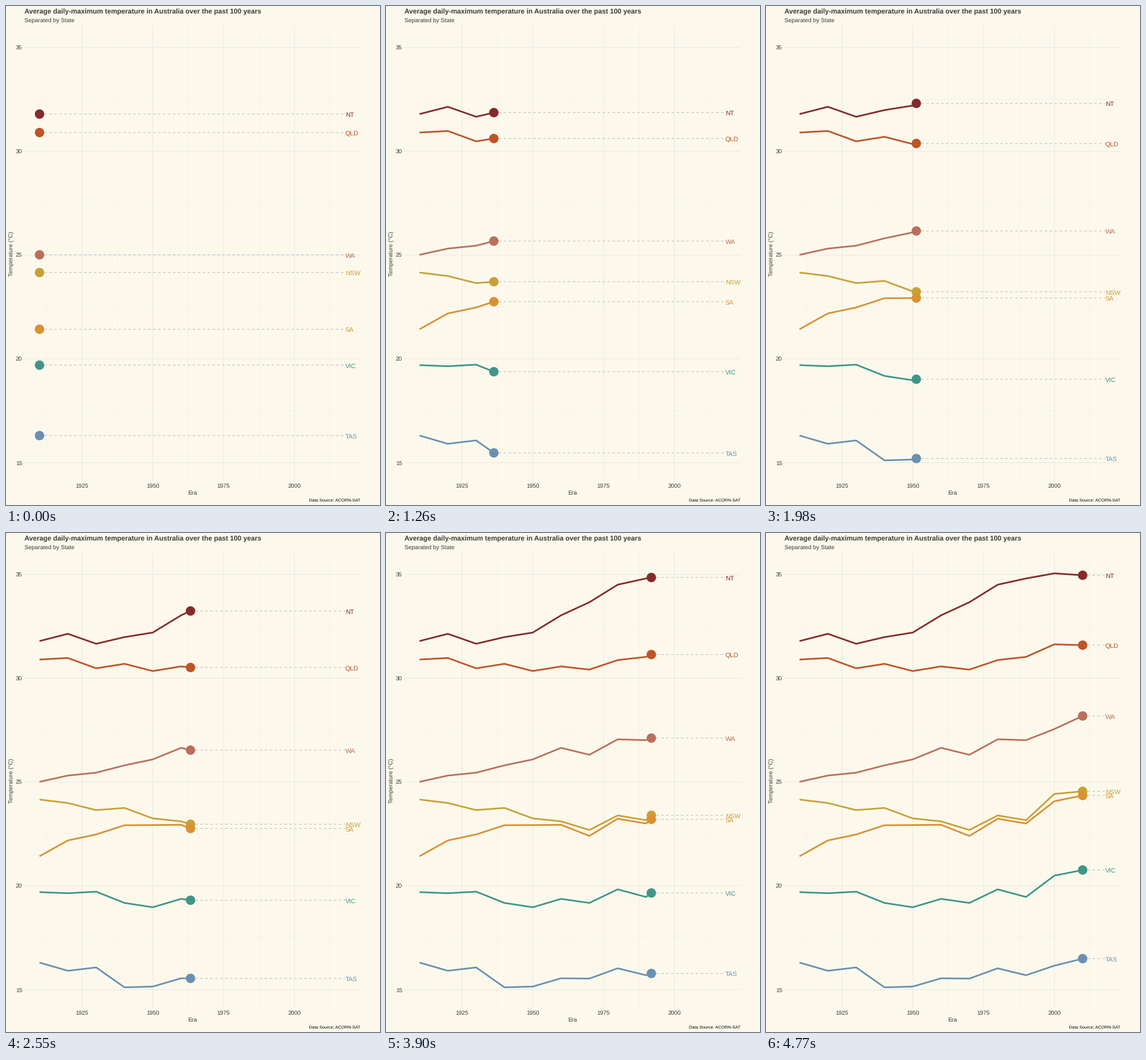
Recreate the animation shown at these times as a matplotlib script. Size 648 px wide and 864 px high, loop 7200 ms.

```python
import numpy as np
import matplotlib.pyplot as plt
from matplotlib.animation import FuncAnimation
from matplotlib.patches import Circle

W, H, DPI = 648, 864, 72
INTERVAL, FRAMES = 30, 240
BACK, INK = "#FCF9EC", "#3A3A3A"
LEFT, RIGHT, TOP, BOTTOM = 31.6, 614.3, 34.3, 822.5
LABEL_YEAR = 2018

plt.rcParams["font.family"] = "Liberation Sans"
plt.rcParams["text.hinting"] = "none"

YEARS = np.arange(1910, 2011, 10)
# The frame at which each decade is reached
ARRIVALS = [0, 16, 32, 48, 64, 80, 95, 111, 127, 143, 159]

STATES = {
    "NSW": ("#C7A137", [24.157, 23.99, 23.648, 23.754, 23.248, 23.106,
                        22.691, 23.392, 23.161, 24.427, 24.552]),
    "NT": ("#842A2C", [31.79, 32.14, 31.66, 31.98, 32.20, 33.03,
                       33.66, 34.505, 34.805, 35.05, 34.96]),
    "QLD": ("#BE5427", [30.90, 30.975, 30.477, 30.694, 30.346, 30.569,
                        30.416, 30.875, 31.028, 31.631, 31.593]),
    "SA": ("#D99133", [21.426, 22.188, 22.475, 22.92, 22.928, 22.939,
                       22.405, 23.234, 23.003, 24.074, 24.352]),
    "TAS": ("#6A90B1", [16.305, 15.91, 16.071, 15.111, 15.15, 15.548,
                        15.534, 16.029, 15.695, 16.154, 16.494]),
    "VIC": ("#3F9688", [19.698, 19.645, 19.72, 19.178, 18.969, 19.373,
                        19.178, 19.832, 19.464, 20.491, 20.763]),
    "WA": ("#BA6F5C", [25.01, 25.312, 25.451, 25.804, 26.09, 26.647,
                       26.313, 27.058, 27.017, 27.551, 28.182]),
}


def px(year):
    return 58.1 + 4.905 * (year - 1910)


def py(temp):
    return 71.7 + 35.95 * (35 - temp)


fig = plt.figure(figsize=(W / DPI, H / DPI), dpi=DPI, facecolor=BACK)
ax = fig.add_axes([0, 0, 1, 1])
ax.set_xlim(0, W)
ax.set_ylim(H, 0)
ax.axis("off")


def stroke(xs, ys, color, width, z, **kw):
    line, = ax.plot(xs, ys, color=color, lw=width, zorder=z, snap=False,
                    solid_capstyle="butt", solid_joinstyle="round", **kw)
    return line


def write(x, y, text, size, color=INK, **kw):
    return ax.text(x, y, text, size=size, color=color, va="baseline", **kw)


def grid(years, temps, color, width, z):
    for year in years:
        stroke([px(year)] * 2, [TOP, BOTTOM], color, width, z)
    for temp in temps:
        stroke([LEFT, RIGHT], [py(temp)] * 2, color, width, z)


grid(np.arange(1912.5, 2013, 25), np.arange(17.5, 33, 5), "#EBEBEB", 0.55, 0)
grid(range(1925, 2001, 25), range(15, 36, 5), "#E8E8E8", 1.07, 1)

for year in range(1925, 2001, 25):
    write(px(year), 835, str(year), 10.15, ha="center")
for temp in range(15, 36, 5):
    write(28, py(temp) + 4.1, str(temp), 10.15, ha="right")

write(31.6, 13.7, "Average daily-maximum temperature in Australia "
      "over the past 100 years", 11.85, weight="bold")
write(31.6, 28, "Separated by State", 10.15)
write(323, 846, "Era", 10.15, ha="center")
write(12, 428.7, "Temperature (°C)", 10.15, ha="center",
      rotation=90, rotation_mode="anchor")
write(614.5, 858, "Data Source: ACORN-SAT", 7.45, "black", ha="right")


class Series:
    def __init__(self, name, color, temps):
        self.ys = py(np.array(temps))
        self.guide = stroke([], [], "#BABABA", 1.07, 2,
                            linestyle=(0, (4, 4)), dash_capstyle="butt")
        self.line = stroke([], [], color, 2.85, 3)
        self.dot = Circle((0, 0), 8.15, fc=color, lw=0, zorder=4)
        ax.add_patch(self.dot)
        self.label = write(px(LABEL_YEAR), 0, name, 11.2, color, zorder=5)

    def show(self, year):
        x, y = px(year), np.interp(year, YEARS, self.ys)
        past = YEARS < year
        self.line.set_data(np.append(px(YEARS[past]), x),
                           np.append(self.ys[past], y))
        self.guide.set_data([x, px(LABEL_YEAR)], [y, y])
        self.dot.center = x, y
        self.label.set_y(y + 4.7)


series = [Series(name, *spec) for name, spec in STATES.items()]


def update(frame):
    year = np.interp(frame, ARRIVALS, YEARS)
    for item in series:
        item.show(year)
    return []


anim = FuncAnimation(fig, update, frames=FRAMES, interval=INTERVAL,
                     init_func=lambda: update(0), repeat=True, repeat_delay=0)
plt.show()
```
